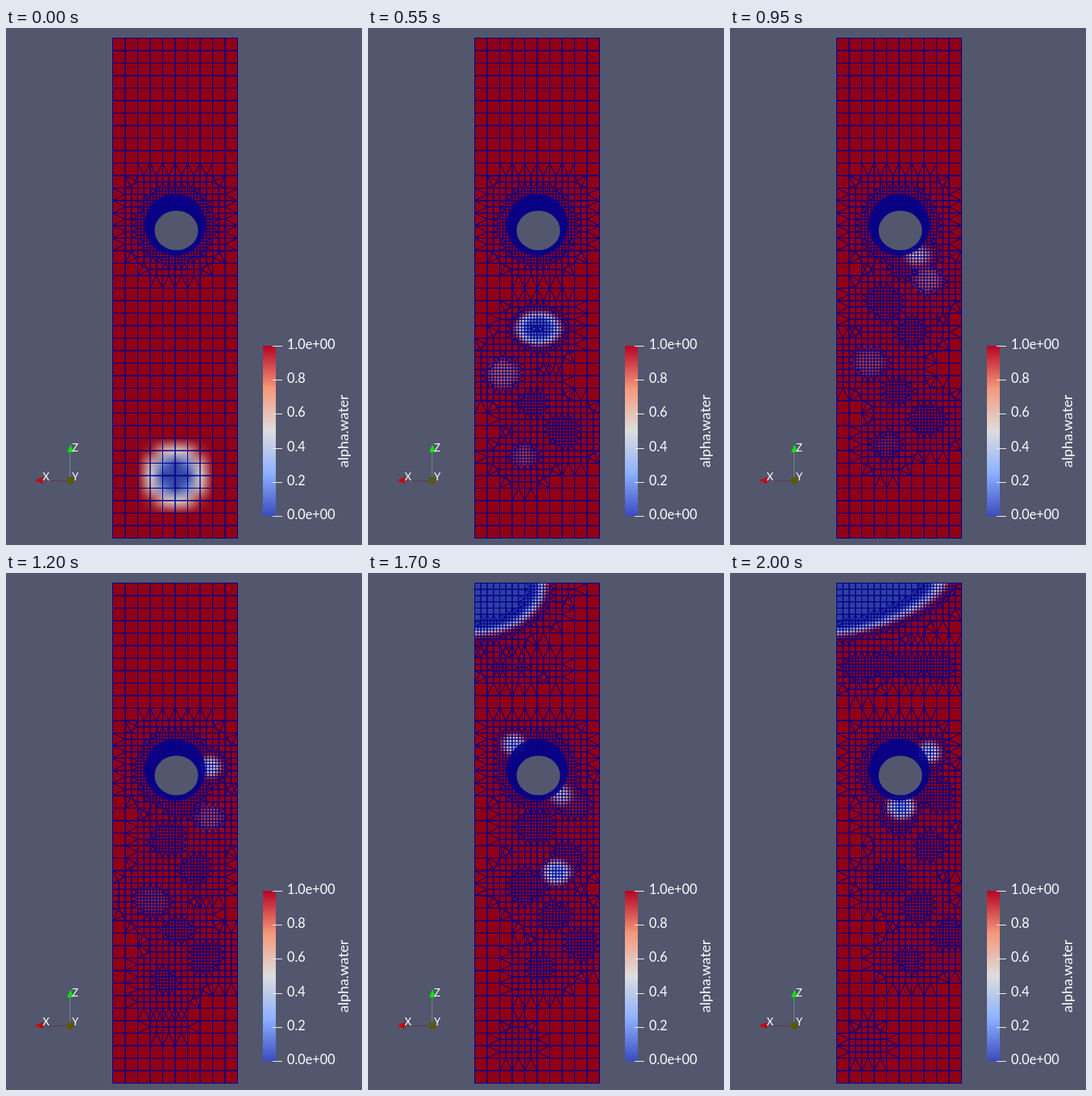
Animation of 442x641 px, one loop 2.05 s. Source, as an HTML page with a canvas:

```html
<!DOCTYPE html>
<html>
<head>
<meta charset="utf-8">
<style>
html, body { margin: 0; width: 442px; height: 641px; overflow: hidden; background: #52576e; }
canvas { display: block; }
</style>
</head>
<body>
<canvas id="stage" width="442" height="641"></canvas>
<script>
const ctx = document.getElementById('stage').getContext('2d');
const LOOP = 2050, STEP = 50, CELL = 15.5, COLS = 10, ROWS = 40, X0 = 132.5, Y0 = 12.5;
const W = COLS * CELL, H = ROWS * CELL, HALF = CELL / 2;
const BG = '#52576e', LINE = '#00008b';
const RING = { x: 210, y: 244 }, ARRIVAL = 950;
const RAMP = [[59, 76, 192], [141, 176, 254], [221, 221, 221], [244, 152, 122], [180, 4, 38]];
const SURFACE = [[47, 62, 160], [125, 158, 228], [216, 214, 212], [218, 135, 105], [144, 0, 22]];

const { sin, cos, PI, sqrt, abs, hypot, min, max, round } = Math;
const clamp = v => max(0, min(1, v));
const frac = v => v - Math.floor(v);
const rand = n => frac(sin(n * 127.1 + 3) * 43758.5453);

function color(ramp, v) {
  const s = clamp(v) * 4, i = min(3, s | 0), f = s - i;
  return ramp[i].map((c, n) => c + (ramp[i + 1][n] - c) * f);
}

// Height of the rising bubble
function riseY(t) {
  const u = t / ARRIVAL;
  return 555 - 273 * (u + 1.1 * u ** 3 * (1 - u));
}

// depth: how much gas; fine and mid: reach of the two refinement levels around the rim
function blobsAt(t) {
  const blobs = [];
  const add = (x, y, rx, ry, depth, more) =>
    blobs.push({ x, y, rx, ry, depth, p: 2, fine: depth ? 8 : 1, mid: 20, ...more });

  if (t <= ARRIVAL) {
    const u = t / ARRIVAL, rx = 31 - 18 * u * u + 3 * sin(2 * PI * u);
    add(210 + 23 * u ** 5, riseY(t), rx, rx * (1 - .27 * min(1, 3 * u)), 1 - .6 * u ** 4);
  }

  // gas creeping round the cylinder at a steady rate
  for (const start of [ARRIVAL, 1650]) {
    const age = t - start, a = (59 - .256 * age) * PI / 180;
    if (age > 0 && age < 900) {
      add(RING.x + 43 * cos(a), RING.y + 43 * sin(a), 11, 10,
        (.4 + .25 * clamp(age / 300)) * clamp((900 - age) / 150), { mid: 10 });
    }
  }

  // eddies shed behind the bubble, drifting slowly up and to the right
  for (let i = 0; i < 8; i++) {
    const start = 80 + 115 * i, age = t - start;
    if (age <= 0) continue;
    const r = (11 + 8 * rand(i)) * clamp(.4 + age / 200);
    add(205 + 85 * (frac(i * .618 + .2) - .5) + .02 * age + 5 * sin(age / 250 + i),
      riseY(start) + 15 - .035 * age, r, r * .9,
      i % 3 ? 0 : .2 * clamp(1 - age / 1100), { fine: 1, mid: 24 });
  }

  // a second bubble gathers and rises faster and faster
  const v = (t - 1300) / 700;
  if (v > 0) add(245 - 33 * v * v, 410 - 120 * v * v, 14, 12, .75 * clamp(v * 1.7), { fine: 5 });

  // gas enters at the top corner, with eddies below it
  const age = t - 1475;
  if (age > 0) {
    add(X0, Y0, 5.6 * sqrt(age), 61 * min(1, sqrt(age / 200)), 1, { p: 2 - .5 * clamp((age - 225) / 300), mid: 24 });
    for (let i = 0; i < 4; i++) {
      const r = (10 + 9 * rand(i + 5)) * clamp((age - 130 - 40 * i) / 250);
      if (r) add(162 + 32 * i, 88 + 34 * rand(i + 20), r, r * .8, 0, { mid: 15 });
    }
  }

  // a coarse patch sinks to the floor
  if (t > 700) {
    const r = 8 + 14 * clamp((t - ARRIVAL) / 500);
    add(202 - 32 * clamp((t - 1450) / 550), 547 + 33 * clamp((t - ARRIVAL) / 500), r, r * .8, 0, { fine: -99, mid: 2 });
  }
  return blobs;
}

// Approximate signed distance to a blob's rim
function dist(b, x, y) {
  const n = (abs((x - b.x) / b.rx) ** b.p + abs((y - b.y) / b.ry) ** b.p) ** (1 / b.p);
  return (n - 1) * min(b.rx, b.ry);
}

const field = document.createElement('canvas'), fctx = field.getContext('2d');

function drawField(t, blobs) {
  const s = t < STEP ? CELL : CELL / 4, w = round(W / s) + 1, h = round(H / s) + 1;
  const rim = 6 + 9 * clamp(1 - t / 200), gas = blobs.filter(b => b.depth > 0);
  field.width = w;
  field.height = h;
  const img = fctx.createImageData(w, h);
  for (let j = 0, o = 0; j < h; j++) for (let i = 0; i < w; i++, o += 4) {
    let v = 1;
    for (const b of gas) v = min(v, 1 - b.depth * clamp(.5 - dist(b, X0 + i * s, Y0 + j * s) / 2 / rim));
    img.data.set([...color(SURFACE, v), 255], o);
  }
  fctx.putImageData(img, 0, 0);
  ctx.save();
  ctx.beginPath();
  ctx.rect(X0, Y0, W, H);
  ctx.clip();
  ctx.drawImage(field, X0 - s / 2, Y0 - s / 2, w * s, h * s);
  ctx.restore();
}

// Marks the cells of one level whose centre passes the test
function mark(size, test) {
  return Array.from({ length: round(H / size) }, (_, j) => Array.from({ length: round(W / size) },
    (_, i) => test(X0 + (i + .5) * size, Y0 + (j + .5) * size, i, j)));
}

function drawMesh(t, blobs) {
  const active = t < STEP ? [] : blobs;
  const ring = (x, y) => hypot(x - RING.x, y - RING.y);
  const fine = mark(HALF, (x, y) => ring(x, y) < 46 || active.some(b => {
    const d = dist(b, x, y);
    return d < b.fine && (b.depth < .9 || d > -10);
  }));
  const mid = mark(CELL, (x, y, i, j) => {
    if (ring(x, y) < 67 || active.some(b => dist(b, x, y) < b.mid)) return true;
    for (let n = -1; n < 3; n++) for (let m = -1; m < 3; m++) if (fine[j * 2 + n]?.[i * 2 + m]) return true;
    return false;
  });

  // A finer neighbour leaves a node mid-edge, joined to the far corners
  function cell(split, i, j, s) {
    const x = X0 + i * s, y = Y0 + j * s, h = s / 2;
    const fan = (on, px, py, ax, ay, bx, by) => {
      if (!on) return;
      ctx.moveTo(x + ax, y + ay);
      ctx.lineTo(x + px, y + py);
      ctx.lineTo(x + bx, y + by);
    };
    ctx.rect(x, y, s, s);
    fan(split[j - 1]?.[i], h, 0, 0, s, s, s);
    fan(split[j + 1]?.[i], h, s, 0, 0, s, 0);
    fan(split[j][i - 1], 0, h, s, 0, s, s);
    fan(split[j][i + 1], s, h, 0, 0, 0, s);
  }

  ctx.beginPath();
  for (let j = 0; j < ROWS * 2; j++) for (let i = 0; i < COLS * 2; i++) {
    const x = X0 + i * HALF, y = Y0 + j * HALF;
    if (!mid[j >> 1][i >> 1]) {
      if (!(i % 2 || j % 2)) cell(mid, i / 2, j / 2, CELL);
    } else if (!fine[j][i]) cell(fine, i, j, HALF);
    else {
      ctx.rect(x, y, HALF, HALF);
      ctx.moveTo(x + HALF / 2, y);
      ctx.lineTo(x + HALF / 2, y + HALF);
      ctx.moveTo(x, y + HALF / 2);
      ctx.lineTo(x + HALF, y + HALF / 2);
    }
  }
  ctx.strokeStyle = LINE;
  ctx.lineWidth = 1;
  ctx.stroke();
}

function disc(x, y, rx, ry, fill) {
  ctx.fillStyle = fill;
  ctx.beginPath();
  ctx.ellipse(x, y, rx, ry, 0, 0, 7);
  ctx.fill();
}

function shape(fill, ...p) {
  ctx.fillStyle = fill;
  ctx.beginPath();
  for (let i = 0; i < p.length; i += 2) ctx.lineTo(p[i], p[i + 1]);
  ctx.fill();
}

function label(text, x, y, size) {
  ctx.font = size + 'px Lato, sans-serif';
  ctx.fillStyle = '#fff';
  ctx.fillText(text, x, y);
}

function drawLegend() {
  const g = ctx.createLinearGradient(0, 605, 0, 394);
  RAMP.forEach((c, i) => g.addColorStop(i / 4, `rgb(${c})`));
  ctx.fillStyle = g;
  ctx.fillRect(319, 394, 16, 211);
  ['1.0e+00', '0.8', '0.6', '0.4', '0.2', '0.0e+00'].forEach((text, i) => {
    const y = round(394 + i * 42.2);
    ctx.fillStyle = '#e8e8ec';
    ctx.fillRect(331, y, 12, 1);
    label(text, 349, y + 4, 16.3);
  });
  ctx.save();
  ctx.translate(425, 545);
  ctx.rotate(-PI / 2);
  label('alpha.water', 0, 0, 17.8);
  ctx.restore();
}

function drawAxes() {
  ctx.fillStyle = '#6b8c80';
  ctx.fillRect(79, 525, 1, 36);
  ctx.fillStyle = '#5e3c50';
  ctx.fillRect(45, 561, 35, 1);
  shape('#0be00b', 80, 516, 84, 526, 76, 526);
  shape('#c80505', 36, 561, 46, 557, 46, 565);
  disc(80, 561, 4.5, 4.5, '#5c5800');
  label('Z', 82, 525, 13);
  label('X', 45.5, 561, 13);
  label('Y', 82, 561, 13);
}

function draw(t) {
  ctx.fillStyle = BG;
  ctx.fillRect(0, 0, 442, 641);
  const blobs = blobsAt(t);
  drawField(t, blobs);
  drawMesh(t, blobs);
  disc(RING.x, RING.y, 38, 38.5, 'rgba(0,0,139,.88)');
  disc(211.5, 251, 27, 24.5, BG);
  drawLegend();
  drawAxes();
}

let last = -1;
function tick() {
  const t = Math.floor(performance.now() % LOOP / STEP) * STEP;
  if (t !== last) draw(last = t);
  requestAnimationFrame(tick);
}
tick();
</script>
</body>
</html>
```
